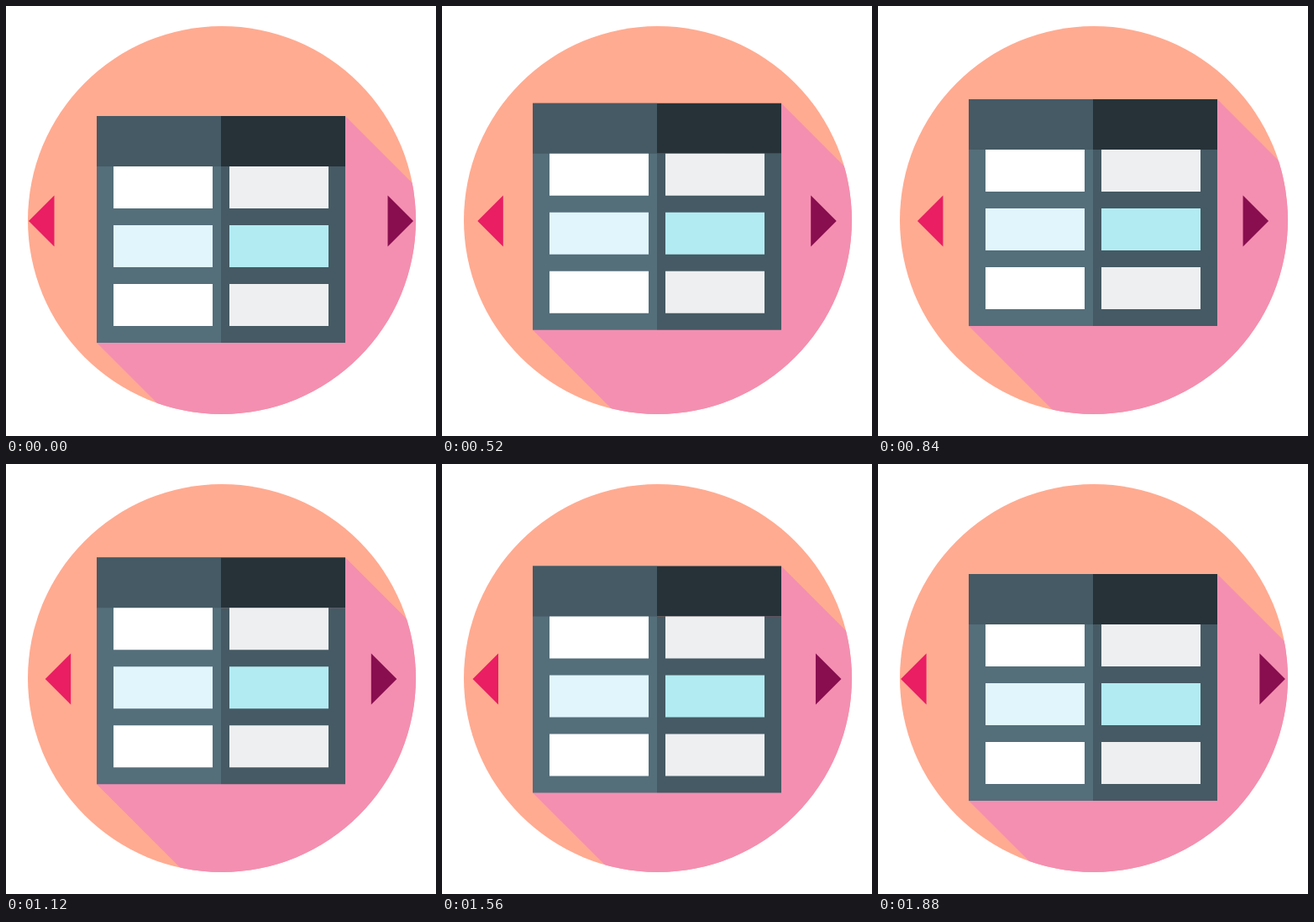
An HTML page that plays this animation: 512x512 px, repeating every 1.92 s.

```html
<!DOCTYPE html>
<html lang="en">
<head>
<meta charset="utf-8">
<title>Table badge</title>
<style>
html, body { margin: 0; width: 100%; height: 100%; overflow: hidden; background: #fff; }
svg { display: block; width: 100vw; height: 100vh; }
</style>
</head>
<body>
<svg viewBox="0 0 512 512">
  <clipPath id="disc"><circle cx="257" cy="255" r="231"/></clipPath>
  <circle cx="257" cy="255" r="231" fill="#ffab91"/>
  <g clip-path="url(#disc)">
    <path id="shadow" fill="#f48fb1" d="M404 131l400 400v270H508L108 401z"/>
  </g>
  <g id="table">
    <path fill="#546e7a" d="M108 131h148v270H108z"/>
    <path fill="#455a64" d="M108 131h148v60H108zM256 191h148v210H256z"/>
    <path fill="#263238" d="M256 131h148v60H256z"/>
    <path fill="#fff" d="M128 191h118v50H128zM128 331h118v50H128z"/>
    <path fill="#eeeff1" d="M266 191h118v50H266zM266 331h118v50H266z"/>
    <path fill="#e1f5fd" d="M128 261h118v50H128z"/>
    <path fill="#b2ebf2" d="M266 261h118v50H266z"/>
  </g>
  <path id="left" fill="#e91e63" d="M27 256l30.5-30.5v61z"/>
  <path id="right" fill="#880e4f" d="M485 256l-30.5-30.5v61z"/>
</svg>
<script>
const LOOP = 1920, STEP = 40, TRAVEL = 20.2;
const part = id => document.getElementById(id);
const move = (id, x, y) => part(id).setAttribute('transform', `translate(${x} ${y})`);

// cubic-bezier(.35, 0, .35, 1), solved by bisection
function ease(x) {
  let lo = 0, hi = 1;
  for (let i = 0; i < 20; i++) {
    const s = (lo + hi) / 2;
    if (1.05 * s * (1 - s) + s ** 3 < x) lo = s; else hi = s;
  }
  return lo * lo * (3 - 2 * lo);
}

function draw(now) {
  const t = Math.floor((now % LOOP) / STEP) * STEP;
  const d = TRAVEL * ease(1 - Math.abs(2 * t / LOOP - 1));
  move('table', 0, -d);
  move('shadow', 0, -d);
  move('left', d, 0);
  move('right', -d, 0);
}

let start;
function tick(now) {
  start ??= now;
  draw(now - start);
  requestAnimationFrame(tick);
}
draw(0);
requestAnimationFrame(tick);
</script>
</body>
</html>
```
